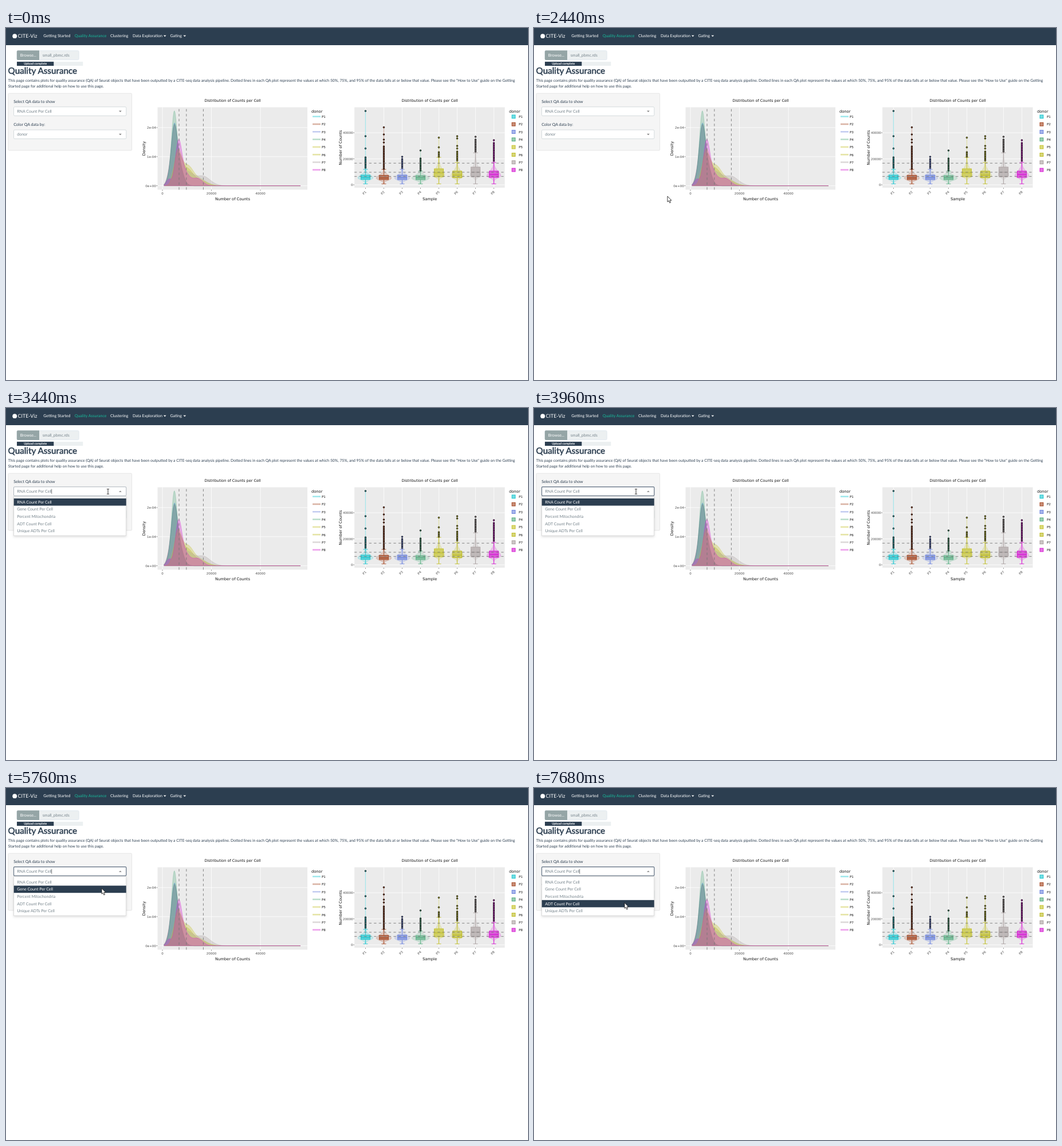
Write an HTML page that moves like this. It is 911 by 615 pixels and loops after 8 s.

```html
<!DOCTYPE html>
<html lang="en">
<head>
<meta charset="utf-8">
<title>Quality Assurance</title>
<style>
  html, body { margin: 0; width: 100%; height: 100%; overflow: hidden; background: #fff; }
  svg { display: block; }
  text { font: 7.05px Lato, sans-serif; fill: #2c3e50; text-rendering: geometricPrecision; white-space: pre; }
  .plot text { font-family: "DejaVu Sans", sans-serif; font-size: 6.7px; fill: #111; }
  .plot .tick { font-size: 5.5px; fill: #4d4d4d; }
  .plot .key { font-size: 5.5px; fill: #111; }
  .plot .title { font-size: 6.5px; }
  .mid { text-anchor: middle; }
  .end { text-anchor: end; }
  text.light { fill: #fff; }
  text.muted { fill: #74828a; }
</style>
</head>
<body>
<svg id="stage" width="911" height="615" viewBox="0 0 911 615"></svg>
<script>
const NAVY = '#2c3e50';
const attrs = o => Object.entries(o).map(([k, v]) => ` ${k}="${v}"`).join('');
const el = (tag, o, inner = '') => `<${tag}${attrs(o)}>${inner}</${tag}>`;
const text = (x, y, s, o = {}) => el('text', { x, y, ...o }, s);
const rect = (x, y, width, height, fill, o = {}) => el('rect', { x, y, width, height, fill, ...o });
const path = (d, o = {}) => el('path', { d, fill: 'none', ...o });
const turned = (x, y, angle, s, cls) =>
  text(0, 0, s, { class: 'mid ' + cls, transform: `translate(${x} ${y}) rotate(${angle})` });
const caret = (x, y, fill, up) => path(`M${x - 2.4} ${y}h4.8l-2.4 ${up ? -2.4 : 2.4}z`, { fill });

// density: [centre x, height, spread]; box: [q3, median, q1, whisker top, violin half width]
// dots: single outliers; chain: [top, bottom] of the dense run of outliers
const donors = [
  { color: '#18c5cf', density: [[293.3, 92, 5.2], [302, 34, 7], [283, 7, 4]],
    box: [257, 261, 264.5, 247, 13], dots: [145, 189, 210.5], chain: [226, 246] },
  { color: '#a4441f', density: [[293.3, 89, 5.3], [302, 36, 7], [283, 9, 4]],
    box: [257.5, 262, 265, 247, 13], dots: [173.5, 186, 195, 200], chain: [207, 246] },
  { color: '#6b82dd', density: [[293.3, 94, 5.2], [302, 32, 7], [283, 8, 4]],
    box: [257, 261.5, 265, 247, 13], dots: [225], chain: [229, 246] },
  { color: '#56ad80', density: [[293.3, 110, 4.7], [301, 34, 7.5], [283, 6, 4]],
    box: [258, 261.5, 265, 250, 15], dots: [214], chain: [228, 249] },
  { color: '#c3c127', density: [[300, 52, 7], [317, 30, 9], [336, 12, 13]],
    box: [246, 253, 260, 226, 10], dots: [191.5, 208.5], chain: [217, 226] },
  { color: '#bdbb22', density: [[300, 58, 6.5], [316, 26, 9], [336, 10, 13]],
    box: [250, 257, 261.5, 235, 11], dots: [189, 193, 206, 210.5], chain: [216, 234] },
  { color: '#aaa0a0', density: [[301, 54, 7], [318, 20, 9], [343, 17, 13], [287, 12, 5]],
    box: [243, 252, 260, 218, 9], dots: [190], chain: [195, 216] },
  { color: '#d417d0', density: [[301, 72, 5.6], [312, 22, 8], [334, 13, 9], [284, 11, 4]],
    box: [250, 256, 261, 235, 12], dots: [196], chain: [201, 234] }
];
const bell = (x, c, s) => Math.exp(-((x - c) ** 2) / (2 * s * s));

function densityCurve({ color, density }) {
  let d = 'M276 275.6';
  for (let x = 276; x <= 514; x++) {
    const h = density.reduce((sum, [c, height, s]) => sum + height * bell(x, c, s), 0);
    d += `L${x} ${(275.6 - h).toFixed(2)}`;
  }
  return path(d + 'V275.6z', { fill: color, 'fill-opacity': .3, stroke: color, 'stroke-width': .8, 'stroke-opacity': .4 });
}

function violin({ color, box, dots }, x) {
  const [q3, , q1, , width] = box, mode = q1 - 2.5, top = dots[0], side = [];
  for (let y = top; y <= 272; y++)
    side.push([.25 + width * bell(y, mode, y < mode ? (q1 - q3) * .75 : 3.4), y]);
  const points = [...side.map(([w, y]) => [x - w, y]), ...side.reverse().map(([w, y]) => [x + w, y])];
  return path('M' + points.map(p => p.map(n => n.toFixed(1)).join(' ')).join('L') + 'z',
    { fill: color, 'fill-opacity': .2, stroke: color, 'stroke-width': .5, 'stroke-opacity': .4 });
}

function boxPlot({ color, box, dots, chain }, x) {
  const [q3, median, q1, top] = box, ys = [...dots];
  for (let y = chain[0]; y <= chain[1]; y += 2.6) ys.push(y);
  return path(`M${x} ${q3}V${top}M${x} ${q1}V272.3M${x - 4} ${top}h8M${x - 4} 272.3h8`, { stroke: color, 'stroke-width': .9 })
    + rect(x - 8, q3, 16, q1 - q3, color, { 'fill-opacity': .6, stroke: color, 'stroke-width': .9 })
    + path(`M${x - 8} ${median}h16`, { stroke: color, 'stroke-width': 1.2 })
    + ys.map(cy => el('circle', { cx: x, cy, r: 1.25, fill: color, stroke: '#000', 'stroke-width': .95 })).join('');
}

const grid = d => path(d, { stroke: '#fff', 'stroke-width': .8 });
const dashed = d => path(d, { stroke: '#777', 'stroke-width': .9, 'stroke-dasharray': 4.27 });
const ticks = d => path(d, { stroke: '#444', 'stroke-width': .6 });

function densityPlot() {
  const xs = [273, 358.5, 444], ys = [174, 224.8, 275.6];
  return rect(264.5, 138.5, 261.5, 144, '#ebebeb')
    + grid(xs.map(x => `M${x} 138.5v144`).join('') + ys.map(y => `M264.5 ${y}h261.5`).join(''))
    + donors.map(densityCurve).join('')
    + dashed('M302 282.5v-144M314.8 282.5v-144M344.4 282.5v-144')
    + ticks(xs.map(x => `M${x} 282.5v2`).join('') + ys.map(y => `M262.3 ${y}h2.2`).join(''))
    + ['0', '20000', '40000'].map((s, i) => text(xs[i], 291.2, s, { class: 'mid tick' })).join('')
    + ['2e-04', '1e-04', '0e+00'].map((s, i) => text(261.8, ys[i] + 2, s, { class: 'end tick' })).join('')
    + text(395.5, 128.8, 'Distribution of Counts per Cell', { class: 'mid title' })
    + text(395.5, 300.8, 'Number of Counts', { class: 'mid' })
    + turned(243.3, 210.5, -90, 'Density', '')
    + text(533, 148.2, 'donor')
    + donors.map(({ color }, i) => rect(535, 153.4 + 13.3 * i, 14, 2.6, color, { opacity: .4 })
      + text(551, 157 + 13.3 * i, 'P' + (i + 1), { class: 'key' })).join('');
}

function samplePlot() {
  const xs = donors.map((_, i) => 627.4 + 32 * i), ys = [183, 228.6, 274];
  return rect(608, 138.5, 262.5, 140.5, '#ebebeb')
    + grid(xs.map(x => `M${x} 138.5v140.5`).join('') + ys.map(y => `M608 ${y}h262.5`).join(''))
    + donors.map((d, i) => violin(d, xs[i])).join('')
    + donors.map((d, i) => boxPlot(d, xs[i])).join('')
    + dashed('M608 236.2h262.5M608 252h262.5M608 259.3h262.5')
    + ticks(xs.map(x => `M${x} 279v2`).join('') + ys.map(y => `M605.8 ${y}h2.2`).join(''))
    + xs.map((x, i) => turned(x - .5, 289.3, -45, 'P' + (i + 1), 'tick')).join('')
    + ['40000', '20000', '0'].map((s, i) => text(605.6, ys[i] + 2, s, { class: 'end tick' })).join('')
    + text(739.5, 128.8, 'Distribution of Counts per Cell', { class: 'mid title' })
    + text(739.5, 300.8, 'Sample', { class: 'mid' })
    + turned(586.3, 209, -90, 'Number of Counts', '')
    + text(878, 148.2, 'donor')
    + donors.map(({ color }, i) => rect(883, 152 + 13.3 * i, 5.8, 5.8, color, { 'fill-opacity': .6, stroke: color })
      + text(895, 157 + 13.3 * i, 'P' + (i + 1), { class: 'key' })).join('');
}

const light = { class: 'light' }, muted = { class: 'muted' };
const selectBox = (y, label, value, id) =>
  text(13.2, y - 7, label)
  + rect(13.5, y, 196.3, 15.6, '#fff', { rx: 1.8, stroke: '#ccd3d6', 'stroke-width': .8, id })
  + text(19.2, y + 10.1, value, muted);

const header = rect(0, 0, 911, 30, NAVY)
  + el('circle', { cx: 15.2, cy: 14.2, r: 3.9, fill: '#fff' })
  + text(20.5, 17.2, 'CITE-Viz', { class: 'light', style: 'font-size:8.9px' })
  + text(65.2, 16, 'Getting Started', light)
  + text(119.8, 16, 'Quality Assurance', { style: 'fill:#18bc9c' })
  + text(182, 16, 'Clustering', light)
  + text(221, 16, 'Data Exploration', light) + caret(277.2, 12.8, '#fff')
  + text(286.4, 16, 'Gating', light) + caret(311.8, 12.8, '#fff');

const upload = rect(19, 39.6, 108.2, 16, '#ecf0f1', { rx: 1.8, stroke: '#dce4ec', 'stroke-width': .7 })
  + path('M58 39.3H20.8q-1.9 0 -1.9 1.9V54q0 1.9 1.9 1.9H58z', { fill: '#95a5a6' })
  + text(24.8, 50, 'Browse...', light)
  + text(63.8, 50, 'small_pbmc.rds', muted)
  + rect(19, 58.9, 115.3, 7.2, '#ecf0f1') + rect(19, 58.9, 64.3, 7.2, NAVY)
  + text(51.2, 64.4, 'Upload complete', { class: 'mid light', style: 'font-size:5.3px;font-weight:700' });

const small = { style: 'font-size:6.78px' };
const intro = text(3.6, 79.9, 'Quality Assurance', { style: `font-size:15.2px;font-weight:500;stroke:${NAVY};stroke-width:.4` })
  + text(3.8, 94.4, 'This page contains plots for quality assurance (QA) of Seurat objects that have been outputted by a CITE-seq data analysis pipeline. Dotted lines in each QA plot represent the values at which 50%, 75%, and 95% of the data falls at or below that value. Please see the "How to Use" guide on the Getting', small)
  + text(3.8, 104.3, 'Started page for additional help on how to use this page.', small);

const sidebar = rect(4, 114.2, 215.6, 99.6, '#f5f5f5', { rx: 1.5, stroke: '#e0e0e0', 'stroke-width': .8 })
  + selectBox(137.8, 'Select QA data to show', 'RNA Count Per Cell', 'control')
  + selectBox(178, 'Color QA data by:', 'donor', 'second')
  + caret(199.4, 184.8, '#808080')
  + el('g', { id: 'closed' }, caret(199.4, 144.6, '#808080'))
  + el('g', { id: 'opened' }, caret(199.4, 146.8, '#808080', true))
  + path('M79.7 141.4v8.6', { id: 'typing', stroke: '#555', 'stroke-width': .7 });

const ROW = 12.6, LIST_TOP = 158;
const options = ['RNA Count Per Cell', 'Gene Count Per Cell', 'Percent Mitochondria', 'ADT Count Per Cell', 'Unique ADTs Per Cell'];
const list = el('g', { id: 'list' },
  rect(13.7, 154.4, 196, 68.6, '#fff', { stroke: '#ccc', 'stroke-width': .6, style: 'filter:drop-shadow(0 2px 2px #0002)' })
  + rect(13.7, LIST_TOP, 196, ROW, NAVY, { id: 'active' })
  + options.map((s, i) => text(19.2, LIST_TOP + ROW * i + 8.7, s, { class: 'option muted' })).join(''));

const outline = { fill: '#fff', stroke: '#000', 'stroke-width': .75, 'stroke-linejoin': 'round' };
const pointers = path('M0 0V9.8L2.2 7.8 3.8 11.6 5.5 10.9 4 7.2H7z', { id: 'arrow', ...outline })
  + path('M-.8 5V.6q.8-1 1.6 0V4l4 .8q.9.3.8 1.4L5 8.6 4.3 10.8H-.3L-3.2 7q0-1.2 1.1-.9z', { id: 'hand', ...outline })
  + path('M-2-4.6q2 0 2 1V3.6q0 1-2 1M2-4.6q-2 0-2 1M0 3.6q0 1 2 1', { id: 'beam', stroke: '#000', 'stroke-width': .8 });

document.getElementById('stage').innerHTML = header + upload + intro
  + el('g', { class: 'plot' }, densityPlot() + samplePlot()) + sidebar + list + pointers;

const $ = id => document.getElementById(id);
const show = (id, on) => $(id).setAttribute('visibility', on ? 'visible' : 'hidden');
const optionTexts = document.querySelectorAll('.option');

const LOOP = 8000, ENTER = 840, OPEN = 3440, BLINK = 528;
// [time, x, y] of the pointer
const route = [
  [840, 850, 611], [1440, 652, 515], [1640, 578, 460], [1680, 578, 460],
  [2280, 268, 318], [2440, 233, 294], [2520, 229, 290], [2560, 227, 286],
  [2840, 192, 185], [3040, 182, 159.6], [3280, 178, 146], [4560, 178, 146],
  [5160, 169, 171], [5600, 169, 171], [5760, 167, 175.3], [6160, 162, 188],
  [6880, 162, 188], [7120, 158, 200.5], [8000, 158, 200.5]
];

function pointerAt(t) {
  const i = Math.max(1, route.findIndex(k => k[0] > t));
  const [t0, x0, y0] = route[i - 1], [t1, x1, y1] = route[i];
  const p = Math.max(0, (t - t0) / (t1 - t0));
  return [x0 + (x1 - x0) * p, y0 + (y1 - y0) * p];
}

function draw() {
  const t = performance.now() % LOOP;
  const [x, y] = pointerAt(t), open = t >= OPEN;
  const overControl = y > 137.8 && y < 153.4;
  const kind = !overControl ? 'arrow' : open ? 'beam' : 'hand';
  for (const id of ['arrow', 'hand', 'beam']) {
    show(id, t >= ENTER && id === kind);
    $(id).setAttribute('transform', `translate(${x} ${y})`);
  }

  show('list', open);
  show('opened', open);
  show('closed', !open);
  show('typing', open && Math.floor((t - OPEN + 10) / BLINK) % 2 === 0);
  const focus = Math.min(1, Math.max(0, (t - OPEN + 40) / 120));
  $('control').setAttribute('stroke', `color-mix(in srgb, #ccd3d6, #748291 ${open ? focus * 100 : 0}%)`);
  $('control').setAttribute('stroke-width', open ? .8 + .6 * focus : .8);

  const active = Math.max(0, Math.floor((y - LIST_TOP) / ROW));
  $('active').setAttribute('y', LIST_TOP + ROW * active);
  optionTexts.forEach((node, i) => node.setAttribute('class', 'option ' + (i === active ? 'light' : 'muted')));
  requestAnimationFrame(draw);
}
draw();
</script>
</body>
</html>
```
